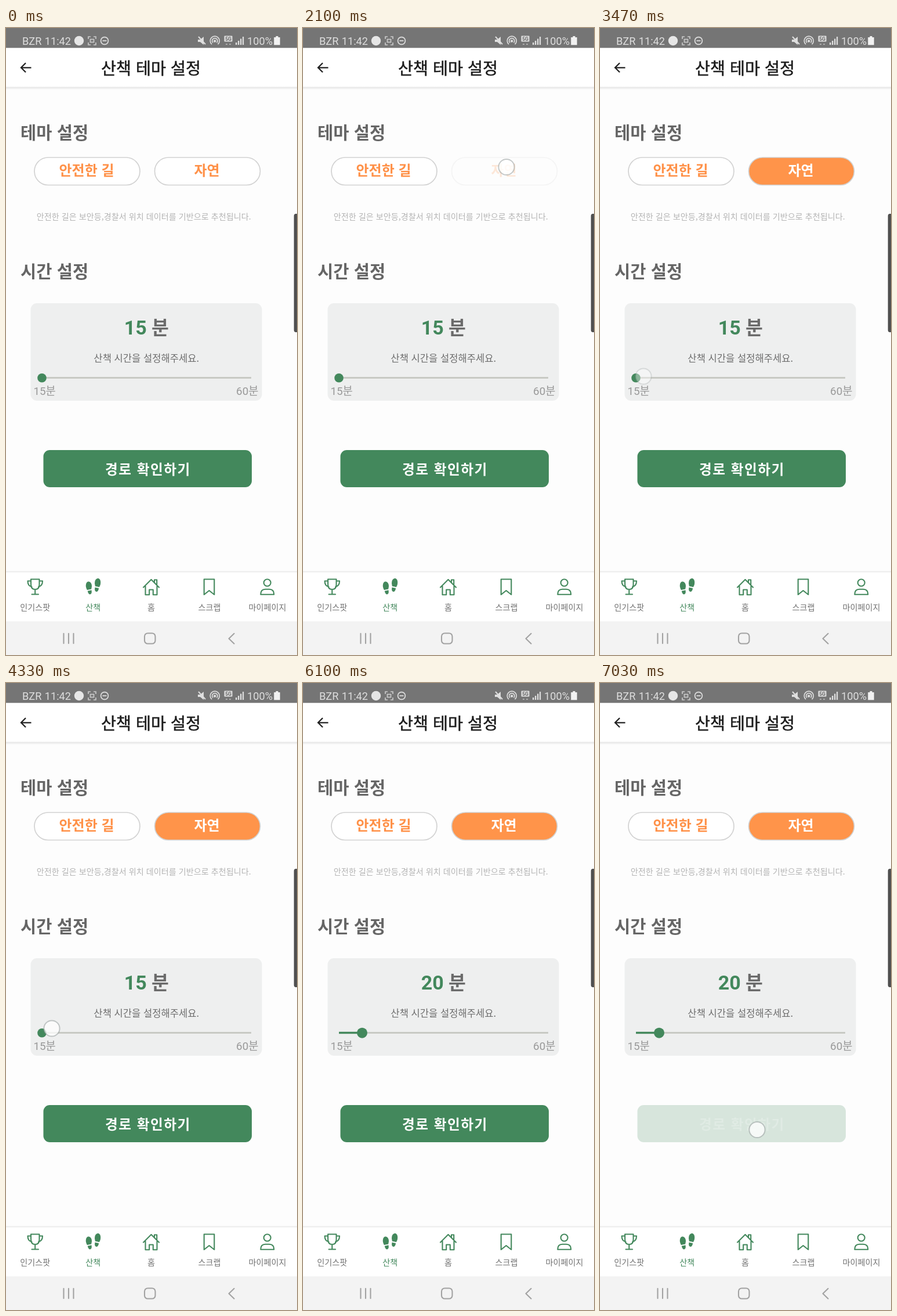
An HTML page that plays this animation: 502x1080 px, repeating every 7060 ms.

```html
<!DOCTYPE html>
<html lang="ko">
<head>
<meta charset="utf-8">
<title>산책 테마 설정</title>
<style>
  html, body { margin: 0; width: 100%; height: 100%; overflow: hidden; background: #fdfdfd; }
  svg { display: block; width: 100vw; height: 100vh; }
  text { font-family: "Noto Sans CJK KR", "Noto Sans CJK", "Noto Sans CJK JP", sans-serif; }
  .roboto { font-family: Roboto, "Noto Sans CJK KR", "Noto Sans CJK", sans-serif; }
  .soft { filter: blur(.6px); }
  .mid { text-anchor: middle; }
  .bold { font-weight: 700; }
  .title { font-size: 28.3px; font-weight: 500; text-anchor: middle; fill: #1c1c1c; stroke: #1c1c1c; stroke-width: .5; }
  .section { font-size: 29.6px; font-weight: 700; fill: #666; }
  .pill { font-size: 24px; font-weight: 700; text-anchor: middle; fill: #ff9148; }
  .tab { font-size: 14.1px; text-anchor: middle; fill: #727272; }
  .line { fill: none; stroke: #43885c; stroke-width: 2.1; stroke-linejoin: round; stroke-linecap: round; }
  .status { fill: none; stroke: #dedede; stroke-width: 1.7; }
  .sys { fill: none; stroke: #a2a2a2; stroke-width: 2.1; stroke-linecap: round; stroke-linejoin: round; }
</style>
</head>
<body>
<svg viewBox="0 0 502 1080" preserveAspectRatio="none">
  <defs>
    <linearGradient id="shade" x2="0" y2="1">
      <stop offset="0" stop-color="#e4e4e4"/><stop offset="1" stop-color="#fdfdfd"/>
    </linearGradient>
  </defs>

  <!-- backgrounds -->
  <rect width="502" height="1080" fill="#fdfdfd"/>
  <rect width="502" height="34.5" fill="#757575"/>
  <rect y="34.5" width="502" height="67.5" fill="#fff"/>
  <rect y="101.5" width="502" height="5" fill="url(#shade)"/>
  <rect y="936" width="502" height="86" fill="#fff"/>
  <path d="M0 936.5H502" stroke="#ececec" stroke-width="2"/>
  <rect y="1022" width="502" height="58" fill="#f3f3f3"/>

  <!-- the recording is slightly soft -->
  <g class="soft">
    <!-- status bar -->
    <g font-size="18.2" fill="#dedede">
      <text class="roboto" x="28" y="28.5">BZR</text>
      <text class="roboto" x="112" y="28.5" text-anchor="end">11:42</text>
      <text class="roboto" x="416" y="28.5">100%</text>
    </g>
    <circle cx="126" cy="22" r="8.2" fill="#e6e6e6"/>
    <g class="status">
      <path d="M142 19v-4h4M151 15h4v4M155 25v4h-4M146 29h-4v-4" opacity=".8"/>
      <rect x="145.5" y="19.5" width="6" height="5" opacity=".8"/>
      <circle cx="170" cy="22" r="6.4"/>
      <path d="M166.5 22h7"/>
      <path d="M355 28.2a8 8 0 1 1 10.5 0M357 25.4a4.6 4.6 0 1 1 6.5 0"/>
      <path d="M332 15l12 13" stroke-width="2"/>
      <path d="M379 28h3M385 28h3" stroke-width="1.3" opacity=".7"/>
    </g>
    <g fill="#dedede">
      <path d="M331 20h4l6-5v14l-6-5h-4z"/>
      <circle cx="360.2" cy="22.5" r="2.2"/>
      <rect x="376.5" y="13.5" width="14" height="10" rx="1"/>
      <text class="roboto bold mid" x="383.5" y="21.7" font-size="8.5" fill="#686868">5G</text>
      <path d="M396 25h2.4v4H396zM400 22h2.4v7H400zM404 18.5h2.4V29H404zM408 15h2.2v14H408z"/>
      <path d="M465.5 14h4v2h3.2v13.2h-10.4V16h3.2z" fill="#f2f2f2"/>
    </g>

    <!-- header -->
    <path d="M43.5 68.3H26.5M34 60.3l-8 8 8 8" fill="none" stroke="#222" stroke-width="2.3"/>
    <text class="title" x="250" y="79.6">산책 테마 설정</text>

    <!-- theme -->
    <text class="section" x="25" y="191">테마 설정</text>
    <rect x="49" y="223" width="182" height="47.5" rx="23.7" fill="#fff" stroke="#d2d2d2" stroke-width="1.7"/>
    <text class="pill" x="139" y="254">안전한 길</text>
    <g id="nature">
      <rect id="natureBox" x="256.5" y="223" width="182" height="47.5" rx="23.7" stroke="#d2d2d2" stroke-width="1.7"/>
      <text id="natureText" class="pill" x="346.5" y="254">자연</text>
    </g>
    <text class="mid" x="237.7" y="330.3" font-size="14.15" fill="#b4b4b4">안전한 길은 보안등,경찰서 위치 데이터를 기반으로 추천됩니다.</text>
    <path d="M506 320h-6q-3.300 0-3.300 4v196q0 4 3.300 4h6z" fill="#505050"/>

    <!-- time -->
    <text class="section" x="25" y="430">시간 설정</text>
    <rect x="42.5" y="474" width="399" height="168" rx="11" fill="#eeefef"/>
    <text id="minutes" class="roboto bold" x="242.7" y="528" font-size="34" fill="#43885c" text-anchor="end"></text>
    <text class="bold" x="251" y="528.3" font-size="32.5" fill="#6b6b6b">분</text>
    <text class="mid" x="242.3" y="574.7" font-size="16.6" fill="#6d6d6d">산책 시간을 설정해주세요.</text>
    <path d="M62 602.5H423" stroke="#c8cac4" stroke-width="3"/>
    <path id="filled" stroke="#43885c" stroke-width="3.4"/>
    <circle id="thumb" cy="602.7" fill="#43885c"/>
    <g font-size="18.8" fill="#999">
      <text class="roboto" x="47.5" y="631.7">15분</text>
      <text class="roboto" x="435.5" y="631.7" text-anchor="end">60분</text>
    </g>

    <!-- confirm -->
    <rect id="confirmBox" x="64.5" y="727" width="359.5" height="64" rx="11" fill="#43885c"/>
    <text id="confirmText" class="bold" x="171" y="768.7" font-size="23.7" letter-spacing="1.5" fill="#fff">경로 확인하기</text>

    <!-- tabs -->
    <g class="line">
      <path d="M43 949.5h14.5v9q0 8.5-7.2 8.5t-7.3-8.5zM43 952.5h-5.5q0 8.5 7 10M57.5 952.5H63q0 8.5-7 10M50.2 967v8M44.5 975.5h11.5"/>
      <path d="M237 963.5l13.5-13.5 13.5 13.5M240.5 961v15.2h6.7v-8.7h6.6v8.7h6.7V961M256 954.5v-4h4.2v8"/>
      <path d="M341.7 949.5h17.6v26.5l-8.8-7-8.8 7z"/>
      <circle cx="450.7" cy="955.5" r="6"/>
      <path d="M439.3 975.8q0-9 8-9h7q8 0 8 9z"/>
    </g>
    <g fill="#43885c">
      <path d="M138 958q1.2-5 5-4.5 5 1 5 8.5l-.8 4.500-7.200 1.500q-3-5-2-10zM140.800 969.700l6.700-1.400q1.300 6.700-2.300 7.200-3.200.3-4.400-5.800z"/>
      <path d="M163 952.5q-1.200-5-5-4.5-5 1-5 8.500l.8 5 7.200 1.500q3-5 2-10.500zM160.200 965l-6.700-1.400q-1.300 6.900 2.300 7.400 3.200.3 4.400-6z"/>
    </g>
    <text class="tab" x="50.2" y="1002.7">인기스팟</text>
    <text class="tab" x="150.3" y="1002.7" style="fill:#43885c">산책</text>
    <text class="tab" x="250.5" y="1002.7">홈</text>
    <text class="tab" x="351" y="1002.7">스크랩</text>
    <text class="tab" x="451" y="1002.7">마이페이지</text>

    <!-- system navigation -->
    <g class="sys">
      <path d="M99.5 1043v17M108 1043v17M116.5 1043v17M393.5 1043l-9 8.7 9 8.7"/>
      <rect x="239" y="1042.5" width="18.5" height="18" rx="5.5"/>
    </g>

    <circle id="touch" r="13.6" fill="#fff" fill-opacity=".75" stroke="#8c9494" stroke-opacity=".5" stroke-width="2"/>
  </g>
</svg>
<script>
  const LOOP = 7060;
  const NATURE = { down: 1930, up: 2270 };
  const DRAG = { down: 3420, start: 5450, step: 5930, up: 6000 };
  const CONFIRM = { down: 6850, up: LOOP };

  const $ = id => document.getElementById(id);
  const set = (id, attrs) => {
    for (const k in attrs) $(id).setAttribute(k, attrs[k]);
  };
  const ramp = (t, a, b) => Math.min(1, Math.max(0, (t - a) / (b - a)));
  const ease = p => p * p * (3 - 2 * p);
  const mix = (a, b, p) => a + (b - a) * p;

  // Opacity of a touchable: dims on press, recovers on release.
  const dim = (t, { down, up }) =>
    t < up ? mix(1, .2, ease(ramp(t, down, down + 140)))
           : mix(.2, 1, ease(ramp(t, up, up + 250)));

  const shown = (t, { down, up }, rise) =>
    ramp(t, down, down + rise) * (1 - ramp(t, up, up + 60));

  function touchAt(t) {
    if (t < 3000) return [351, 239.5, shown(t, NATURE, 40)];
    if (t < 6400) {
      const settle = ease(ramp(t, 3470, 3750));
      const drag = ease(ramp(t, DRAG.start, DRAG.step));
      return [mix(75, 79, settle) + 21 * drag, mix(600, 595, settle), shown(t, DRAG, 100)];
    }
    return [271, 769.5, shown(t, CONFIRM, 40)];
  }

  function draw(t) {
    const chosen = t >= NATURE.up;
    set('nature', { opacity: dim(t, NATURE) });
    set('natureBox', { fill: chosen ? '#ff944a' : '#fff' });
    $('natureText').style.fill = chosen ? '#fff' : '#ff9148';

    const moved = t >= DRAG.step;
    const x = moved ? 102 : 62;
    $('minutes').textContent = moved ? '20' : '15';
    set('filled', { d: `M62 602.5H${x}` });
    set('thumb', { cx: x, r: moved ? 9 : 7.8 });

    const press = dim(t, CONFIRM);
    set('confirmBox', { opacity: press });
    set('confirmText', { opacity: press });

    const [cx, cy, opacity] = touchAt(t);
    set('touch', { cx, cy, opacity });
  }

  const begin = performance.now();
  function tick() {
    draw((performance.now() - begin) % LOOP);
    requestAnimationFrame(tick);
  }
  draw(0);
  requestAnimationFrame(tick);
</script>
</body>
</html>
```
